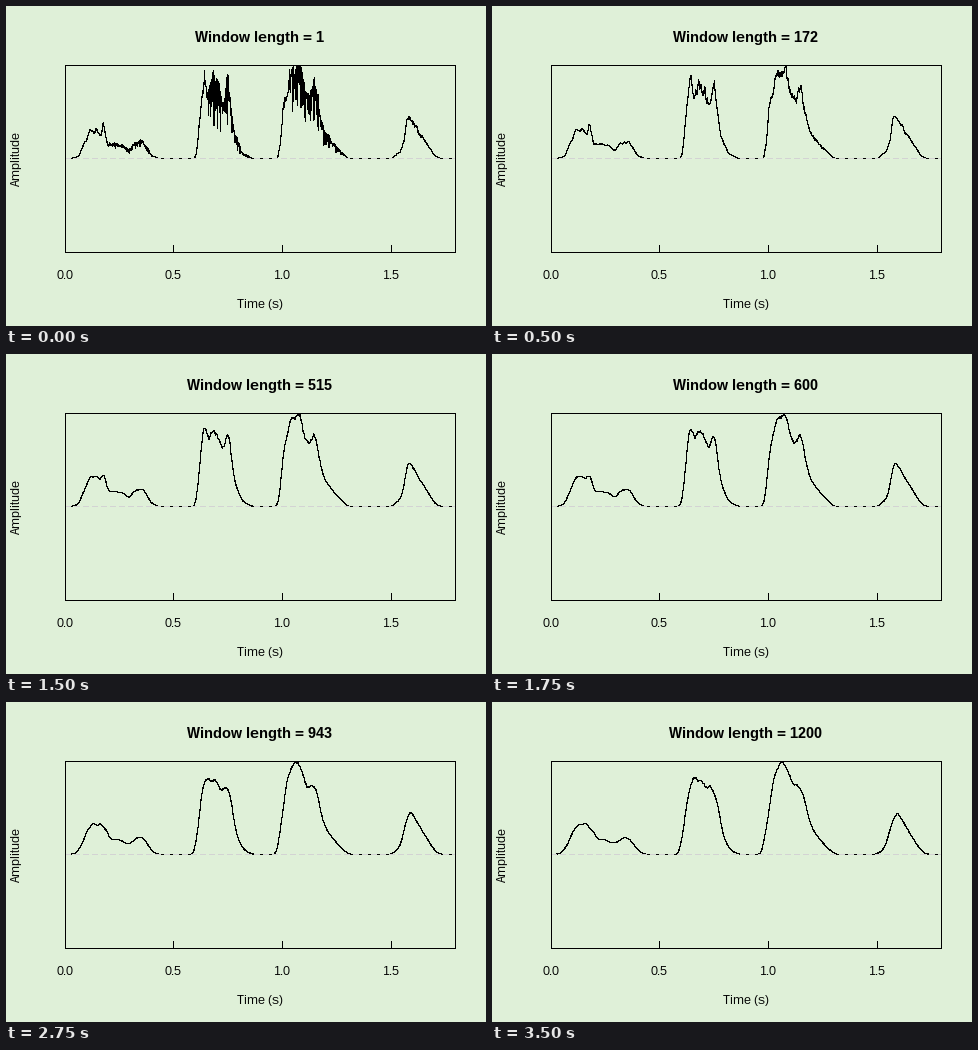
Animation of 480x320 px, one loop 3750 ms. Source, as a matplotlib script:

```python
import numpy as np
import matplotlib as mpl
import matplotlib.pyplot as plt
from matplotlib.animation import FuncAnimation

W, H, DPI = 480, 320, 80
PX = 72 / DPI                      # one pixel in points
FRAMES, INTERVAL = 15, 250
LEFT, RIGHT, TOP, BOTTOM, ZERO = 59, 449, 59, 246, 152
HEIGHT = ZERO - TOP
PX_PER_SECOND = 217.67
SAMPLES_PER_PX = 22050 / PX_PER_SECOND
STEPS = 10                         # curve points per pixel

mpl.rcParams.update({
    "font.family": "Liberation Sans",
    "text.hinting": "default",
    "text.hinting_factor": 1,
    "path.simplify": False,
})

# Calls of the song: flicker strength, where it sets in, outline as (x, height)
CALLS = [
    (.16, 98, [(64, 0), (72, 2), (83, 27), (90, 27), (95, 24), (97, 32),
               (101, 14), (117, 13), (122, 8), (129, 15), (137, 16),
               (145, 3), (152, 0)]),
    (.27, 199, [(188, 0), (190, 6), (195, 58), (198, 78), (201, 57),
                (207, 74), (216, 53), (222, 68), (228, 22), (236, 5),
                (246, 0)]),
    (.22, 281, [(271, 0), (274, 15), (277, 53), (284, 81), (291, 85),
                (292, 95), (298, 64), (303, 51), (308, 75), (313, 42),
                (319, 22), (330, 10), (342, 0)]),
    (.04, 400, [(385, 0), (394, 7), (398, 18), (400, 40), (406, 37),
                (413, 25), (422, 13), (428, 3), (434, 0)]),
]

xs = np.linspace(LEFT, RIGHT, (RIGHT - LEFT) * STEPS + 1)


def moving_average(values, width):
    area = np.concatenate([[0], np.cumsum((values[1:] + values[:-1]) / 2)])
    area /= STEPS
    upper = np.interp(xs + width / 2, xs, area)
    lower = np.interp(xs - width / 2, xs, area)
    return (upper - lower) / width


def random_curve(rng, spacing):
    nodes = np.arange(LEFT, RIGHT + spacing, spacing)
    return np.interp(xs, nodes, rng.normal(size=nodes.size))


def raw_envelope():
    rng = np.random.default_rng(7)
    # Skewed flicker: small rises, deep dips
    flicker = 1 - np.minimum(random_curve(rng, .3) ** 2, 3.2)
    flicker -= moving_average(flicker, 1.7)
    ripple = 1 + .05 * random_curve(rng, 1.3)
    total = np.zeros_like(xs)
    for strength, onset, outline in CALLS:
        level = np.interp(xs, *zip(*outline))
        fade_in = np.clip((xs - onset) / 4, .15, 1)
        total += level * ripple * (1 + strength * fade_in * flicker)
    return np.clip(total, 0, HEIGHT)


RAW = raw_envelope()


def window_length(i):
    return round(1 + i * 1199 / (FRAMES - 1))


def envelope(length):
    smooth = moving_average(RAW, length / SAMPLES_PER_PX)
    return smooth / smooth.max()


fig = plt.figure(figsize=(W / DPI, H / DPI), dpi=DPI, facecolor="#DFF0D8")
ax = fig.add_axes([0, 0, 1, 1])
ax.set(xlim=(0, W), ylim=(H, 0))
ax.axis("off")


def stroke(x, y, color="black", **kw):
    """Crisp one-pixel line through pixel centres."""
    return ax.plot(np.asarray(x) + .5, np.asarray(y) + .5, color=color, lw=PX,
                   antialiased=False, snap=False, solid_joinstyle="miter",
                   solid_capstyle="projecting", **kw)[0]


def label(x, y, text, size=12, **kw):
    return ax.text(x, y, text, fontsize=size * PX, ha="center",
                   va="baseline", **kw)


curve = stroke(np.round(xs), np.full(xs.size, ZERO))
stroke([LEFT, RIGHT], [ZERO, ZERO], "#D3D3D3", dashes=(5, 3),
       dash_capstyle="butt")
stroke([LEFT, RIGHT, RIGHT, LEFT, LEFT], [TOP, TOP, BOTTOM, BOTTOM, TOP])

for t in (0, .5, 1, 1.5):
    x = int(LEFT + t * PX_PER_SECOND)
    stroke([x, x], [BOTTOM - 7, BOTTOM])
    label(x, 273, f"{t:.1f}")

label(254, 302, "Time (s)")
label(14, 152, "Amplitude", rotation=90, rotation_mode="anchor")
title = label(253.5, 36, "", 14.5, weight="bold")


def update(i):
    length = window_length(i)
    title.set_text(f"Window length = {length}")
    curve.set_ydata(np.round(ZERO - HEIGHT * envelope(length)) + .5)
    return curve, title


anim = FuncAnimation(fig, update, frames=FRAMES, interval=INTERVAL,
                     repeat=True, repeat_delay=0)
plt.show()
```
